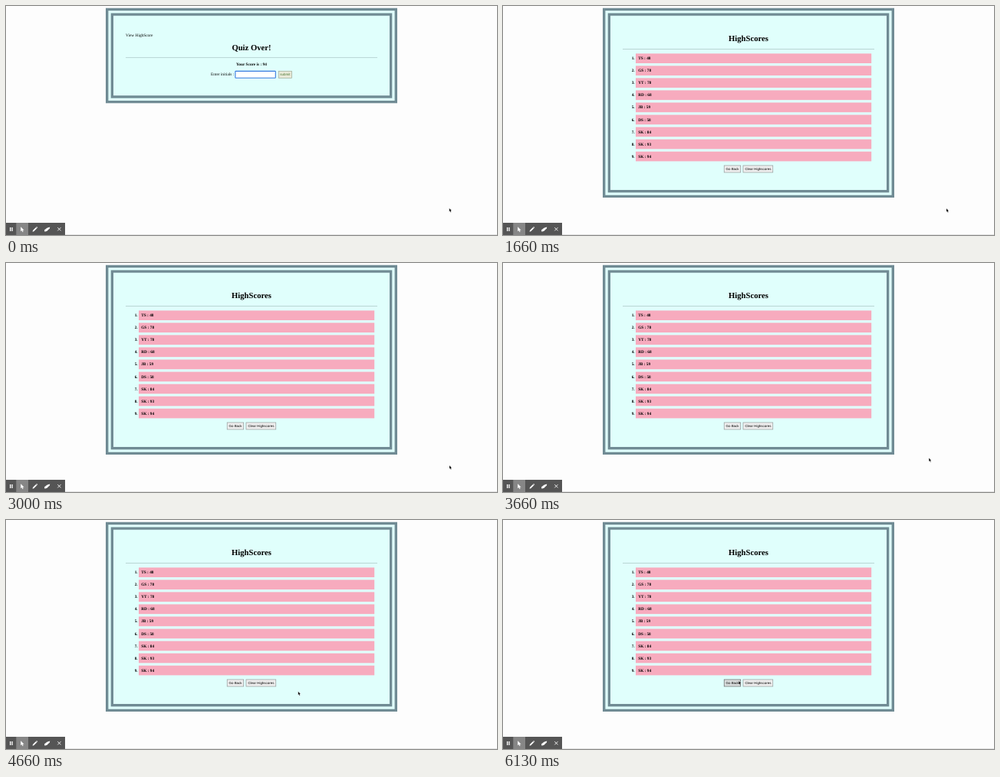
These frames come from a looping animation (640 px wide and 300 px high, 6.53 s). An HTML page:

```html
<!DOCTYPE html>
<html lang="en">
<head>
<meta charset="utf-8">
<title>Quiz scores</title>
<style>
html, body { margin: 0; width: 100%; height: 100%; overflow: hidden; background: #fdfdfd; }
svg { display: block; width: 640px; height: 300px; }
text { font: 5.333px "Liberation Serif", "Times New Roman", serif; text-rendering: geometricPrecision; }
.bold { font-weight: bold; }
.title { font-size: 10.667px; font-weight: bold; }
.ui { font: 4.444px "Liberation Sans", Arial, sans-serif; }
.mid { text-anchor: middle; }
.end { text-anchor: end; }
.rule { stroke: #a9c3c3; stroke-width: .7; }
.row { fill: #f7abbe; }
.button { fill: #efefef; stroke: #858b8b; stroke-width: .6; }
.hover { fill: #d9dddd; stroke: #505555; }
</style>
</head>
<body>
<svg viewBox="0 0 640 300">
  <path d="M77 299.5H640" stroke="#e4e4e4"/>
  <rect x="130" y="2.7" width="380" id="outer" fill="#708b94"/>
  <rect x="133.4" y="6.1" width="373.2" id="gap" fill="#e0fffc"/>
  <rect x="136.7" y="9.4" width="366.6" id="inner" fill="#708b94"/>
  <rect x="140" y="12.7" width="360" id="panel" fill="#e0fffc"/>

  <g id="over">
    <text x="156" y="39.5">View HighScore</text>
    <text class="title mid" x="320" y="57.7">Quiz Over!</text>
    <path class="rule" d="M156 67.6H484"/>
    <text class="bold mid" x="320" y="78.2">Your Score is : 94</text>
    <text x="267" y="91.4">Enter initials :</text>
    <rect x="298.9" y="85.4" width="52.4" height="8.9" rx=".5" fill="#fff" stroke="#3479df" stroke-width="1.1"/>
    <text class="ui" id="initials" x="300.9" y="91.4"></text>
    <rect x="355.3" y="85.3" width="17.2" height="9" fill="#e9ead9" stroke="#9da996" stroke-width=".7"/>
    <text class="ui mid" x="363.9" y="91.3" fill="#477531">submit</text>
  </g>

  <g id="scores">
    <text class="title mid" x="320" y="46.2">HighScores</text>
    <path class="rule" d="M156 56.5H484"/>
    <g id="list"></g>
    <rect class="button" id="back" x="288.2" y="209" width="21.5" height="9"/>
    <text class="ui mid" x="299" y="215">Go Back</text>
    <rect class="button" x="313" y="209" width="38.8" height="9"/>
    <text class="ui mid" x="332.4" y="215">Clear Highscores</text>
  </g>

  <rect y="284" width="77" height="16" fill="#555"/>
  <rect x="13.3" y="284" width="15.7" height="16" fill="#868686"/>
  <g fill="#fff">
    <path d="M5 290h1.3v5H5zM7.4 290h1.3v5H7.4z"/>
    <path d="M19.2 289.3v6l1.4-1.2 1 2.2 1-.5-1-2.1h2z"/>
    <path d="M34.6 295.7l.4-1.7 4-4 1.3 1.3-4 4zM39.4 289.6l.6-.6 1.3 1.3-.6.6z"/>
    <path d="M50 293.5l3.5-2.8 3.8-1.2-.5 2-3.3 3.3-3 .9z"/>
    <path d="M67.3 290.2l4.2 4.2m0-4.2l-4.2 4.2" stroke="#fff" stroke-width=".9"/>
  </g>
  <path id="pointer" d="M0 0V4.3L1 3.4 1.8 5.2 2.5 4.9 1.7 3.1H3Z" fill="#111" stroke="#fff" stroke-width=".5" paint-order="stroke"/>
</svg>
<script>
const LOOP = 6530, FPS = 15;
const $ = id => document.getElementById(id);

const entries = ["TS : 48", "GS : 78", "YT : 78", "RD : 68", "JB : 59", "DS : 58", "SK : 84", "SK : 93", "SK : 94"];
$("list").innerHTML = entries.map((entry, i) => `<g transform="translate(0 ${i * 16.05})">
  <rect class="row" x="173" y="62.3" width="307.2" height="12.7"/>
  <text class="bold end" x="171.7" y="70.3">${i + 1}.</text>
  <text class="bold" x="176.2" y="70.3">${entry}</text></g>`).join("");

// Pointer path: time, x, y
const path = [
  [0, 577.8, 265], [1130, 577.8, 265], [1200, 578, 265.3], [3467, 578, 265.3],
  [3800, 540, 249], [4067, 452.7, 219.7], [4133, 417, 222], [4467, 388, 226],
  [4800, 376, 224], [5000, 351, 226], [5200, 337, 217], [5400, 293.3, 199],
  [5600, 291, 206], [5800, 300, 219], [6133, 307.3, 211], [LOOP, 307.3, 211]
];

function pointerAt(t) {
  const i = Math.max(1, path.findIndex(p => p[0] >= t));
  const [t0, x0, y0] = path[i - 1], [t1, x1, y1] = path[i];
  const k = (t - t0) / (t1 - t0);
  return [x0 + (x1 - x0) * k, y0 + (y1 - y0) * k];
}

function setBottom(y) {
  ["outer", "gap", "inner", "panel"].forEach((id, i) =>
    $(id).setAttribute("height", y - 2.7 - i * 6.67));
}

function draw(now) {
  const t = now % LOOP;
  const tick = Math.min(LOOP, Math.floor((t + 7) * FPS / 1000) * 1000 / FPS);
  const listed = t >= 1660;
  const [x, y] = pointerAt(tick);

  $("over").style.display = listed ? "none" : "";
  $("scores").style.display = listed ? "" : "none";
  setBottom(listed ? 251 : 127.3);
  $("initials").textContent = t < 530 ? "" : t < 730 ? "S" : "SK";
  $("back").classList.toggle("hover", listed && x > 288 && x < 310 && y > 209 && y < 218);
  $("pointer").setAttribute("transform", `translate(${x} ${y})`);
  requestAnimationFrame(draw);
}
requestAnimationFrame(draw);
</script>
</body>
</html>
```
